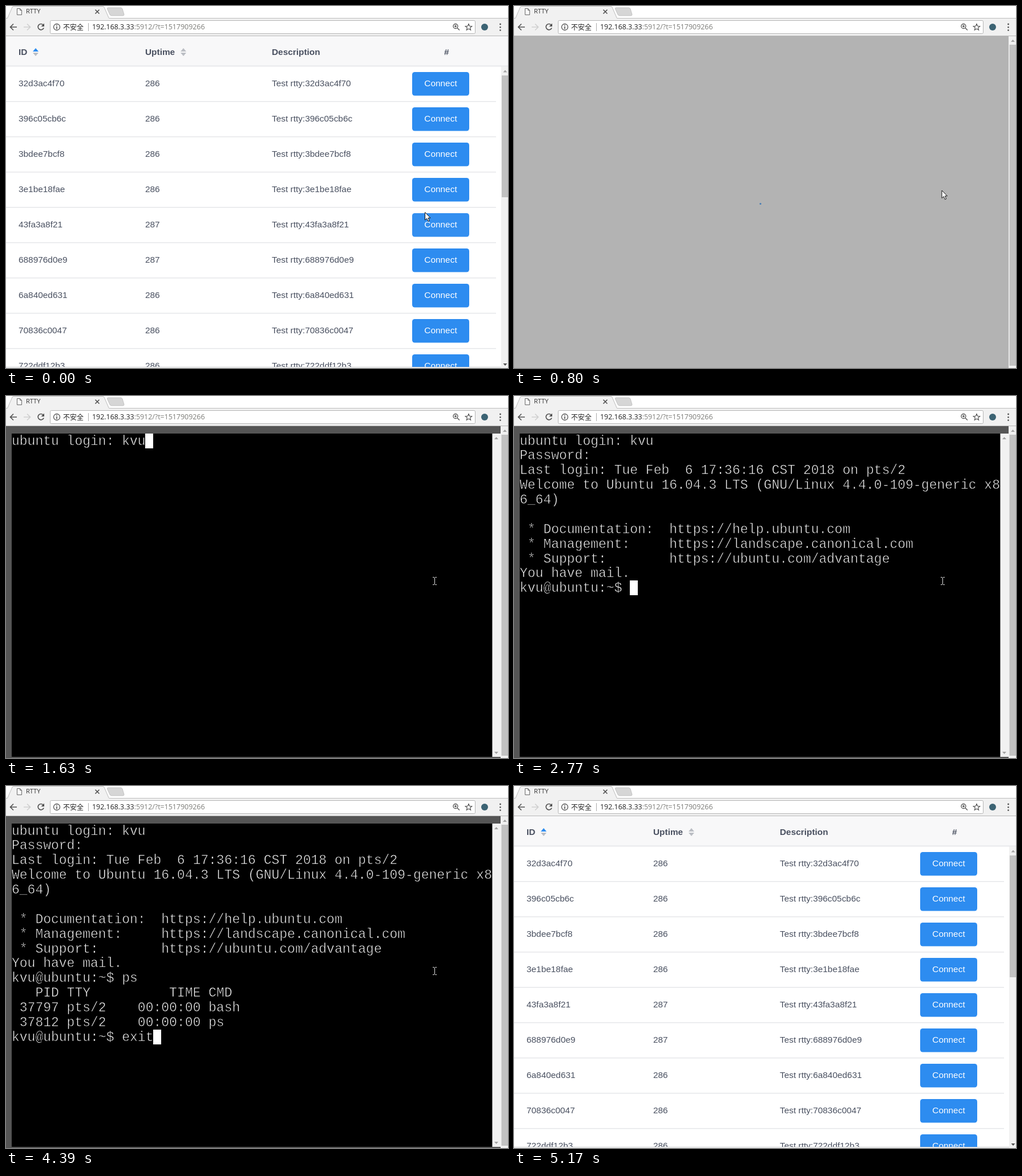
These frames come from a looping animation (880 by 636 pixels, 5330 ms). An HTML page:

```html
<!DOCTYPE html>
<html lang="en">
<head>
<meta charset="utf-8">
<title>RTTY</title>
<style>
  html, body { margin: 0; width: 100%; height: 100%; overflow: hidden; background: #fff; }
  svg { display: block; }
  text { white-space: pre; }
  .ui { font-family: "Open Sans", "Noto Sans", sans-serif; }
  .cjk { font: 12px "Noto Sans CJK SC", "Noto Sans CJK", sans-serif; }
  .table { font: 15.4px "Liberation Sans", Arial, sans-serif; fill: #495060; }
  .table .head { font-weight: bold; }
  /* the black stroke thins the glyphs */
  .mono { font: 23px "Liberation Mono", "Courier New", monospace; fill: #f4f4f4; stroke: #000; stroke-width: .6; }
  .icon { fill: none; stroke: #505050; stroke-width: 1.6; }
</style>
</head>
<body>
<svg width="880" height="636" viewBox="0 0 880 636">
  <rect width="880" height="636" fill="#fff"/>

  <g id="list" class="table">
    <g id="rows"></g>
    <rect y="634" width="868" height="2" fill="#fff"/>
    <path d="M0 634.5H868" stroke="#c9cacc"/>
    <rect y="53" width="880" height="52" fill="#f8f8f9"/>
    <path d="M0 105.5H880" stroke="#e3e4e7" stroke-width="1.4"/>
    <g class="head">
      <text x="22" y="85.5">ID</text>
      <text x="244" y="85.5">Uptime</text>
      <text x="466" y="85.5">Description</text>
      <text x="768" y="85.5">#</text>
    </g>
    <path d="M47 80l5-6 5 6z" fill="#2d8cf0"/>
    <path d="M47 82h10l-5 6zM306 82h10l-5 6zM306 80l5-6 5 6z" fill="#bbbec4"/>
    <rect x="868" y="106" width="12" height="530" fill="#f1f1f1"/>
    <rect x="869" y="122" width="11" height="214" fill="#c1c1c1"/>
    <path d="M871.5 116.5l3.5-4 3.5 4z" fill="#a3a3a3"/>
    <path d="M871.5 628l3.5 4 3.5-4z" fill="#505050"/>
  </g>

  <g id="session">
    <rect y="53" width="867" height="583" fill="#555"/>
    <g id="terminal">
      <rect x="10" y="66" width="842.5" height="568"/>
      <rect x="852.5" y="66" width="14.5" height="568" fill="#f1f1f1"/>
      <path d="M856 76l3.5-4 3.5 4zM856 625l3.5 4 3.5-4z" fill="#a3a3a3"/>
      <g id="lines" class="mono"></g>
      <rect id="caret" width="14" height="26" fill="#fff"/>
    </g>
    <g id="overlay">
      <rect y="53" width="867" height="583" fill="#fff" fill-opacity=".9"/>
      <circle id="spinner" cx="432" cy="347.5" fill="#2d8cf0"/>
    </g>
    <rect x="867" y="53" width="13" height="583" fill="#f1f1f1"/>
    <rect x="868.5" y="68" width="11.5" height="564" fill="#c1c1c1"/>
    <path d="M871 63l3.5-4 3.5 4z" fill="#a3a3a3"/>
  </g>

  <g id="browser">
    <rect width="880" height="21" fill="#fff"/>
    <rect y="21" width="880" height="31.5" fill="#f1f1f1"/>
    <path d="M2 22L11 2Q12 0 14 0H169Q171 0 172 2L181 22z" fill="#f1f1f1"/>
    <path d="M0 21.5H2.5L11 2Q12 .5 14 .5H169Q171 .5 172 2L180.5 21.5H880" fill="none" stroke="#bcbcbc"/>
    <path d="M0 52.5H880" stroke="#b8b8b8"/>
    <path d="M179 3H201Q203 3 204 5L207 15Q207 17 205 17H185Q183 17 182 15L177.5 5Q177 3 179 3z" fill="#d6d6d6" stroke="#c2c2c2"/>
    <path d="M19.5 4.5H24.5L27.5 7.5V15.5H19.5zM24.5 4.5V7.5H27.5" fill="#fff" stroke="#666"/>
    <text class="ui" x="35" y="13" font-size="11" fill="#333">RTTY</text>
    <path class="icon" d="M156.5 6.5l7 7m0-7l-7 7"/>
    <path class="icon" d="M19 37H8M13 31.5L7.5 37L13 42.5"/>
    <path class="icon" d="M31 37H42M37 31.5L42.5 37L37 42.5" style="stroke:#cfcfcf"/>
    <path class="icon" d="M65.5 33.5A5.2 5.2 0 1 0 66.2 38.5"/>
    <path d="M67 30.5V36H61.5z" fill="#505050"/>
    <rect x="77.5" y="25.5" width="745" height="23" rx="2" fill="#fff" stroke="#b4b4b4"/>
    <circle class="icon" cx="89" cy="37" r="5.5" style="stroke-width:1.3"/>
    <path class="icon" d="M89 36V40.5M89 33.5V35"/>
    <text class="cjk" x="100" y="41.5" fill="#222">不安全</text>
    <path d="M144.5 30V44" stroke="#aaa"/>
    <text class="ui" x="151" y="41.3" font-size="12.4" fill="#222">192.168.3.33<tspan fill="#7c7c78">:5912/?t=1517909266</tspan></text>
    <circle class="icon" cx="788" cy="35.5" r="4" style="stroke-width:1.3"/>
    <path class="icon" d="M791 38.5l4 4M786 35.5h4M788 33.5v4" style="stroke-width:1.3"/>
    <path class="icon" d="M811 31.5l1.6 3.8 4.1.3-3.1 2.7 1 4-3.6-2.2-3.6 2.2 1-4-3.1-2.7 4.1-.3z" style="stroke-width:1.2"/>
    <circle cx="839" cy="37" r="6" fill="#3c6373"/>
    <path d="M866.5 32v0M866.5 37.3v0M866.5 42.6v0" stroke="#505050" stroke-width="2.8" stroke-linecap="round"/>
  </g>

  <path id="arrow" d="M.5 .5V14L3.7 11.2L6 16.3L8.2 15.3L6 10.3H10z" fill="#fff" stroke="#111"/>
  <path id="beam" d="M748 318.5h2.500l1 1 1-1h2.500M751.5 319v12M748 331.5h2.500l1-1 1 1h2.500" fill="none" stroke="#e4e4e4"/>
</svg>
<script>
const LOOP = 5330;
const CELL = 13.8, ROW = 25.87, LEFT = 10, TOP = 66;
const USER = 'kvu';
const PROMPT = USER + '@ubuntu:~$ ';
const $ = id => document.getElementById(id);
const show = (id, on) => $(id).setAttribute('display', on ? 'inline' : 'none');
const clamp = v => Math.max(0, Math.min(1, v));

function add(parent, tag, attrs, content = '') {
  const node = document.createElementNS('http://www.w3.org/2000/svg', tag);
  for (const key in attrs) node.setAttribute(key, attrs[key]);
  node.textContent = content;
  parent.append(node);
  return node;
}

// Device table
const devices = ['32d3ac4f70', '396c05cb6c', '3bdee7bcf8', '3e1be18fae', '43fa3a8f21',
  '688976d0e9', '6a840ed631', '70836c0047', '722ddf12b3'];
const buttons = devices.map((id, i) => {
  const rows = $('rows'), top = 106 + 62 * i, y = top + 35;
  add(rows, 'text', { x: 22, y }, id);
  add(rows, 'text', { x: 244, y }, i === 4 || i === 5 ? '287' : '286');
  add(rows, 'text', { x: 466, y }, 'Test rtty:' + id);
  const button = add(rows, 'rect', { x: 712, y: top + 10, width: 100, height: 41.5, rx: 4.5 });
  add(rows, 'text', { x: 762, y, 'text-anchor': 'middle', fill: '#fff' }, 'Connect');
  add(rows, 'rect', { x: 0, y: top + 61, width: 859, height: 1.5, fill: '#e6e7ea' });
  return button;
});

// Terminal output, appended at each time
const feed = [
  [950, 'ubuntu login: '],
  [1320, USER[0]], [1550, USER[1]], [1630, USER[2]],
  [1940, '\nPassword: '],
  [2630, '\nLast login: Tue Feb  6 17:36:16 CST 2018 on pts/2\n'],
  [2700, 'Welcome to Ubuntu 16.04.3 LTS (GNU/Linux 4.4.0-109-generic x8\n6_64)\n\n' +
    ' * Documentation:  https://help.ubuntu.com\n' +
    ' * Management:     https://landscape.canonical.com\n' +
    ' * Support:        https://ubuntu.com/advantage\n'],
  [2770, 'You have mail.\n' + PROMPT],
  [3150, 'ps'],
  [3620, '\n   PID TTY          TIME CMD\n' +
    ' 37797 pts/2    00:00:00 bash\n 37812 pts/2    00:00:00 ps\n' + PROMPT],
  [3930, 'e'], [4080, 'x'], [4160, 'i'], [4390, 't'],
  [4770, '\nlogout\n']
];
const lines = Array.from({ length: 18 }, (_, i) =>
  add($('lines'), 'text', { x: LEFT, y: TOP + 19.6 + ROW * i }));

function drawTerminal(t) {
  const output = feed.filter(([at]) => t >= at).map(([, text]) => text).join('').split('\n');
  lines.forEach((line, i) => {
    const text = output[i] || '';
    if (line.textContent !== text) line.textContent = text;
  });
  const last = output.length - 1;
  $('caret').setAttribute('x', Math.floor(LEFT + output[last].length * CELL));
  $('caret').setAttribute('y', Math.floor(TOP + last * ROW));
  show('caret', t < 2410 || t >= 2630);
}

// Pointer path and button highlights: time, x, y, fourth button, fifth button
const pointer = [
  [0, 734, 362, 0, .15], [70, 738, 352, 0, .3], [140, 743, 340, .3, 0],
  [220, 748, 329, .8, 0], [300, 749.5, 323.5, 1, 0]
];

function paint(button, glow) {
  const mix = (a, b) => Math.round(a + (b - a) * glow);
  button.setAttribute('fill', `rgb(${mix(45, 87)},${mix(140, 163)},${mix(240, 243)})`);
}

function drawPointer(t) {
  const [, x, y, fourth, fifth] = pointer.filter(([at]) => t >= at).pop();
  const gone = t >= 5170;
  $('arrow').setAttribute('transform', `translate(${x} ${y})`);
  buttons.forEach((button, i) => paint(button, gone ? 0 : i === 3 ? fourth : i === 4 ? fifth : 0));
  const typing = t >= 1100 && t < 4850;
  show('beam', typing);
  show('arrow', !typing && !gone);
}

const fadeSteps = [540, 620, 710, 800, 860, 950, 1030];

function drawOverlay(t) {
  const visible = t >= 540 && t < 1100;
  show('overlay', visible);
  if (!visible) return;
  const at = fadeSteps.filter(step => t >= step).pop();
  const growth = clamp((at - 745) / 690);
  $('overlay').setAttribute('opacity', clamp(Math.min((at - 551) / 405, (1130 - at) / 300)));
  $('spinner').setAttribute('r', 19.5 * growth);
  $('spinner').setAttribute('opacity', 1 - growth);
}

function draw(t) {
  const connected = t >= 540 && t < 4850;
  show('list', !connected);
  show('session', connected);
  show('terminal', t >= 950);
  drawTerminal(t);
  drawOverlay(t);
  drawPointer(t);
}

const start = performance.now();
function tick() {
  draw((performance.now() - start) % LOOP);
  requestAnimationFrame(tick);
}
tick();
</script>
</body>
</html>
```
